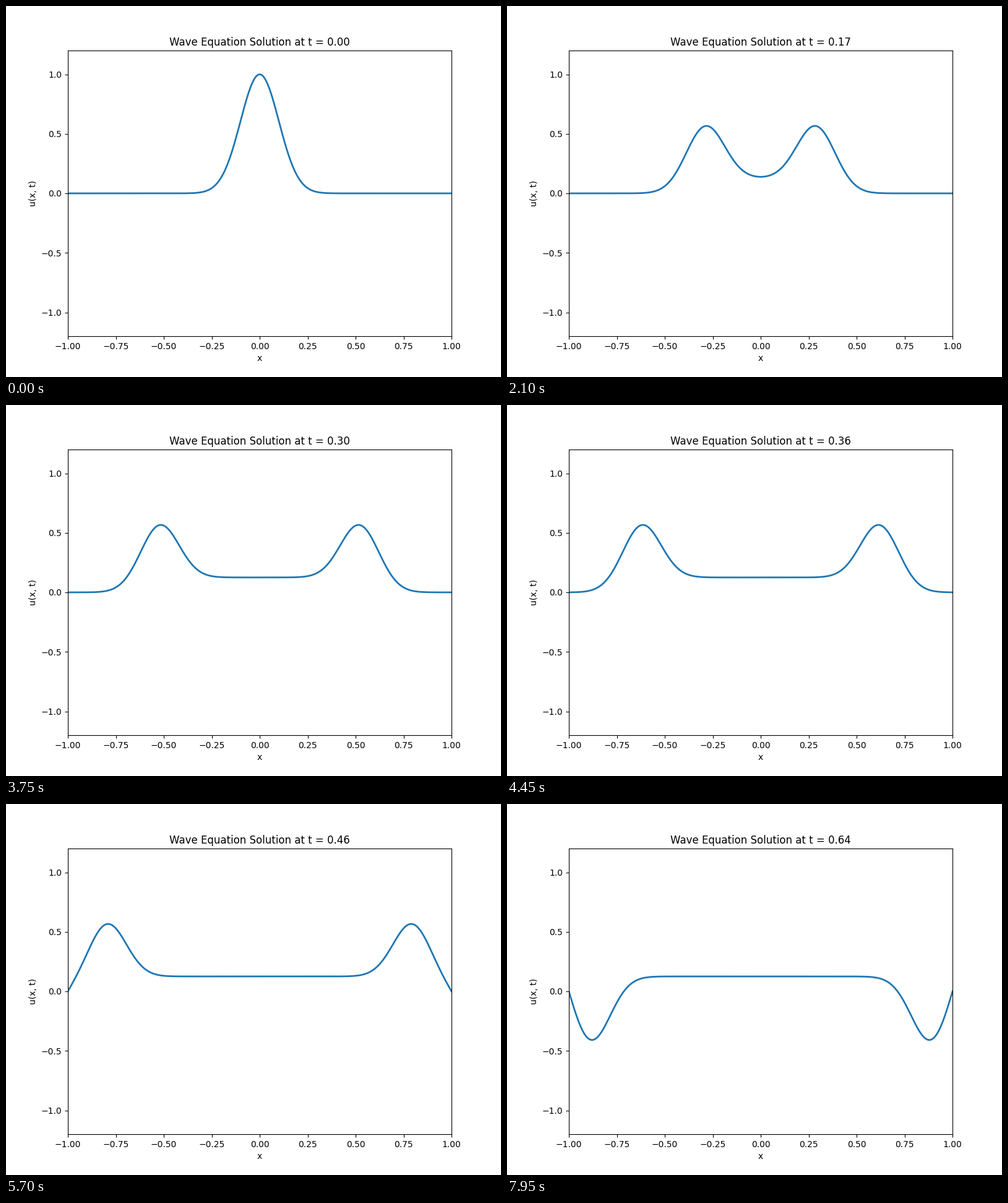
Recreate the animation shown at these times as a matplotlib script. Size 800 by 600 pixels, loop 8 s.

```python
import math

import numpy as np
import matplotlib.pyplot as plt
from matplotlib.animation import FuncAnimation

FRAMES = 160
INTERVAL = 50
DT = 2 / 499       # time shown per frame
STEP = 0.00705     # distance the wave travels per frame
SIGMA = 0.1
GAIN = 1 + STEP / 2

x = np.linspace(-1, 1, 201)
erf = np.vectorize(math.erf)


def pulse(d):
    return np.exp(-d**2 / (2 * SIGMA**2))


def pulse_area(d):
    return SIGMA * math.sqrt(math.pi / 2) * erf(d / (SIGMA * math.sqrt(2)))


def spread(d, s):
    """Free-space wave after travelling s, from a pulse with initial velocity."""
    shape = pulse(d - s) + pulse(d + s)
    push = pulse_area(d + s) - pulse_area(d - s)
    return (GAIN * shape + push) / 2


def wave(n):
    if n == 0:
        return pulse(x)
    s = (n - 0.5) * STEP
    # Mirrored pulses hold both ends at zero
    return spread(x, s) - spread(x - 2, s) - spread(x + 2, s)


fig, ax = plt.subplots(figsize=(8, 6), dpi=100)
line, = ax.plot(x, wave(0), color="#1f77b4", lw=2)
ax.set_xlim(-1, 1)
ax.set_ylim(-1.2, 1.2)
ax.set_xlabel("x")
ax.set_ylabel("u(x, t)")
title = ax.set_title("Wave Equation Solution at t = 0.00")


def update(n):
    line.set_ydata(wave(n))
    title.set_text(f"Wave Equation Solution at t = {n * DT:.2f}")
    return line, title


anim = FuncAnimation(fig, update, frames=FRAMES, interval=INTERVAL,
                     repeat=True, repeat_delay=0, blit=False)
plt.show()
```
